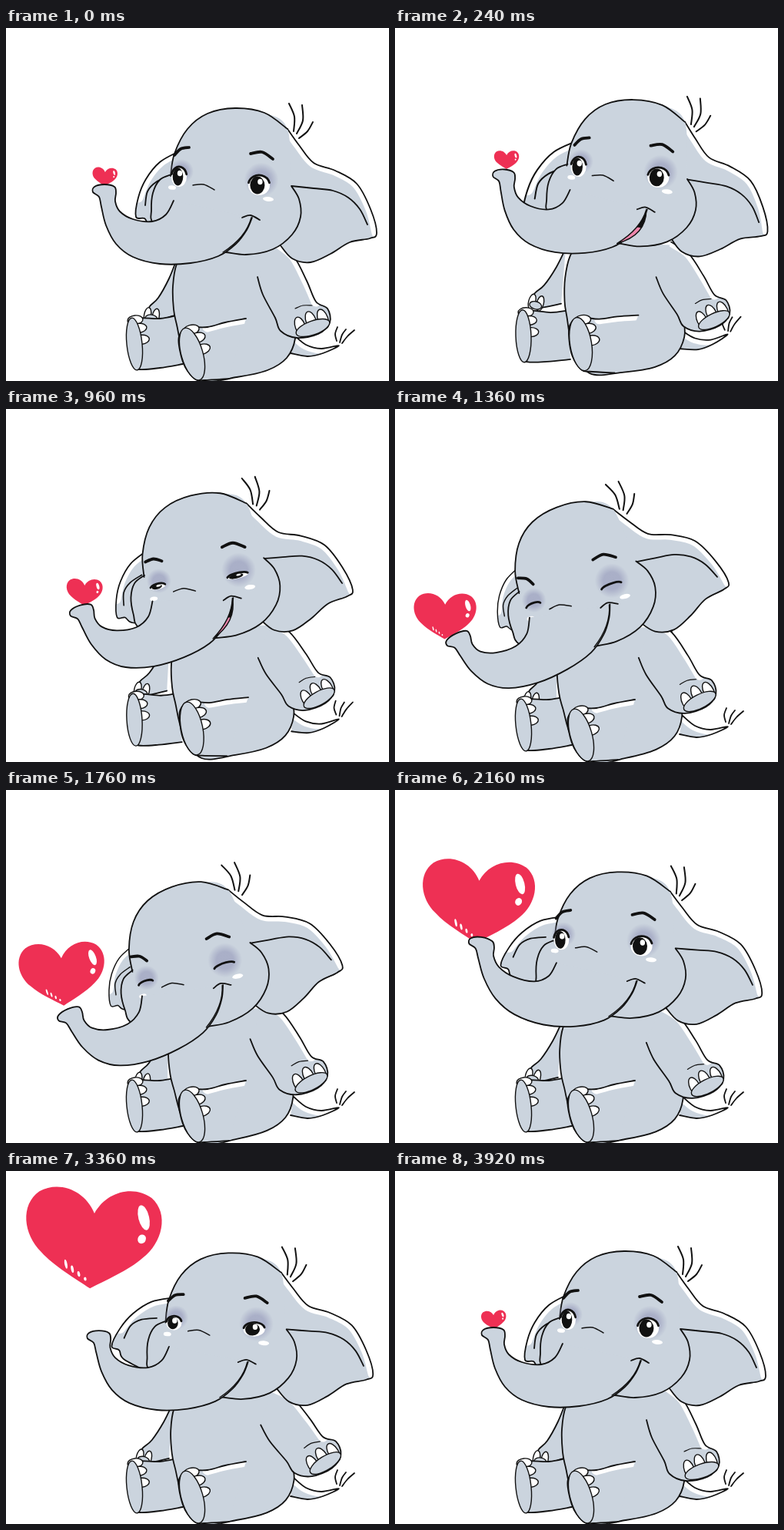
Write an HTML page with a canvas that moves like this. It is 498 px wide and 458 px high and loops after 4 s.

```html
<!DOCTYPE html>
<html lang="en">
<head>
<meta charset="utf-8">
<title>Elephant and heart</title>
<style>
html, body { margin: 0; width: 100%; height: 100%; overflow: hidden; background: #fff; }
canvas { display: block; }
</style>
</head>
<body>
<canvas id="stage" width="498" height="458"></canvas>
<script>
const ctx = document.getElementById('stage').getContext('2d');
const SKIN = '#cbd4de', INK = '#111', RED = '#ee3054', LOOP = 4000;

// Limbs move as [dx, dy, degrees, scale] around their own pivots.
const still = [0, 0, 0, 1];
const rest = {
  head: still, earL: still, earR: still, armL: still, armR: still,
  legL: still, legR: still, body: still, tail: still,
  tip: [0, 0], look: [0, 0], open: [1], laugh: [0]
};
const leanBack = {
  ...rest, head: [22, -27, 4, 1], earL: [0, 0, 5, 1.28], earR: [0, 0, 5, 1],
  armL: [0, -36, 12, 1], armR: [26, -4, -15, .9], legL: [0, -26, 10, 1], legR: [-1, -33, 17, 1],
  body: [4, -16, 8, 1], tail: [0, -15, -21, 1], tip: [14, -11], look: [11, 0], laugh: [1]
};
const bow = {
  ...rest, head: [-50, 12, -20, 1], earL: [0, 0, 4, .8], earR: [0, 0, 3, 1], armL: [-12, 4, 0, 1],
  armR: [-12, -3, -7, 1], body: [-4, 0, -3, 1], tip: [-10, 11], look: [1, 21], open: [0]
};
const lookUp = {
  ...rest, head: [-6, 2, -1.5, 1], earL: [0, 0, 20, 1],
  armL: [-5, 1, 4, 1], armR: [1, 2, -12, 1], body: [-2, 0, -1, 1], tip: [-1, -3]
};
const lift = { ...lookUp, armR: [-2, 2, -7, 1], tip: [-10, -21], look: [-2, -3] };
const squint = { ...lookUp, open: [.7] };

const poseKeys = [[0, rest], [560, leanBack], [1160, bow], [1680, bow], [2160, lift],
  [2640, lookUp], [3040, lookUp], [3360, squint], [3440, squint], [3920, rest]];
// time, [x, y, width]
const heartKeys = [[0, [128.5, 193, 32]], [560, [167, 142, 32]], [1120, [76, 276, 52]],
  [1360, [65, 269, 80]], [1680, [66, 258, 103]], [2160, [108, 145, 144]], [2280, [109, 126, 144]],
  [2800, [111.5, 90, 143]], [3360, [113, 88, 174]], [3680, [113, 84, 196]], [3720, [128, 203, 0]], [3920, [128.5, 193, 32]]];

const mix = (a, b, k) => a.map((v, i) => v + (b[i] - v) * k);
const smooth = k => k * k * (3 - 2 * k);
function span(keys, t) {
  const i = keys.findLastIndex(k => k[0] <= t), a = keys[i], b = keys[i + 1] || [LOOP, keys[0][1]];
  return [a[1], b[1], (t - a[0]) / (b[0] - a[0])];
}
function poseAt(t) {
  const [a, b, k] = span(poseKeys, t), pose = {};
  for (const name in rest) pose[name] = mix(a[name], b[name], smooth(k));
  return pose;
}

const pts = text => text.split(' ').map(Number);

// Catmull-Rom curve through a flat list of points
function curve(p) {
  const path = new Path2D(), last = p.length / 2 - 1;
  const get = (i, c) => p[2 * Math.max(0, Math.min(last, i)) + c];
  path.moveTo(p[0], p[1]);
  for (let i = 0; i < last; i++) {
    const [x, y] = [0, 1].map(c => [get(i, c) + (get(i + 1, c) - get(i - 1, c)) / 6,
      get(i + 1, c) - (get(i + 2, c) - get(i, c)) / 6, get(i + 1, c)]);
    path.bezierCurveTo(x[0], y[0], x[1], y[1], x[2], y[2]);
  }
  return path;
}
function fill(path, color = SKIN) {
  ctx.fillStyle = color;
  ctx.fill(path);
}
function stroke(path, width = 1.8, color = INK) {
  ctx.lineWidth = width;
  ctx.strokeStyle = color;
  ctx.stroke(path);
}
const line = (text, width) => stroke(curve(pts(text)), width);

// Filled outline with a white rim along the points rimFrom..rimTo
function shape(text, rimFrom, rimTo) {
  const p = pts(text), path = curve(p);
  fill(path);
  if (rimTo) {
    ctx.save();
    ctx.clip(path);
    stroke(curve(p.slice(rimFrom * 2, rimTo * 2)), 13, '#fff');
    ctx.restore();
  }
  stroke(path);
}
function oval(x, y, rx, ry, color, tilt = 0, outline = 0) {
  const path = new Path2D();
  path.ellipse(x, y, rx, ry, tilt, 0, 7);
  fill(path, color);
  if (outline) stroke(path, outline);
}
function group([dx, dy, deg, scale], px, py, draw) {
  ctx.save();
  ctx.translate(px + dx, py + dy);
  ctx.rotate(deg * Math.PI / 180);
  ctx.scale(scale, scale);
  ctx.translate(-px, -py);
  draw();
  ctx.restore();
}

// Nails sit on the edge of the sole, which covers their roots.
function paw(x, y, rx, ry, tilt, angles, nailX, nailY) {
  group([0, 0, tilt, 1], x, y, () => {
    for (const deg of angles) {
      const a = deg * Math.PI / 180;
      oval(x + rx * Math.cos(a), y + ry * Math.sin(a), nailX, nailY, '#fff', 0, 1.4);
    }
    oval(x, y, rx, ry, SKIN, 0, 1.4);
  });
}

const heartPath = new Path2D('M0-.19C.08-.36.28-.42.42-.33C.56-.22.52 0 .38.12C.28.22.1.31 0 .37C-.1.31-.28.22-.38.12C-.52 0-.56-.22-.42-.33C-.28-.42-.08-.36 0-.19');
function heart(t) {
  const [x, y, w] = mix(...span(heartKeys, t));
  if (w < 1) return;
  ctx.save();
  ctx.translate(x, y);
  ctx.rotate(.06 * Math.sin((t - 3080) / 1120 * 2 * Math.PI));
  ctx.scale(w, w);
  fill(heartPath, RED);
  oval(.37, -.18, .04, .095, '#fff', -.3);
  oval(.365, -.02, .03, .035, '#fff', .4);
  if (w > 60) for (let i = 0; i < 4; i++) oval(-.19 + i * .05, .2 + i * .034, .01, .035 - i * .007, '#fff', -.25);
  ctx.restore();
}

function eye(x, y, rx, open) {
  const r = rx * 1.6, ry = 13 * open;
  const glow = ctx.createRadialGradient(x + 3, y - 7, r * .5, x + 3, y - 7, r);
  glow.addColorStop(0, 'rgba(152,156,188,.65)');
  glow.addColorStop(1, 'rgba(152,156,188,0)');
  oval(x + 3, y - 7, r, r, glow);
  if (ry > 2) {
    oval(x, y, rx, ry, '#fff');
    oval(x - rx * .15, y, rx * .68, ry * .88, INK);
    oval(x + rx * .1, y - ry * .35, 3.2, Math.min(3.8, ry * .4), '#fff');
  }
  const lid = new Path2D();
  lid.ellipse(x, y, rx, Math.max(ry, 4), 0, Math.PI * 1.08, Math.PI * 1.92);
  stroke(lid, 2.8);
}

function mouth(laugh) {
  const path = new Path2D(`M319 246Q312 272 282 291Q${312 + 20 * laugh} ${272 + 20 * laugh} 319 246`);
  ctx.save();
  ctx.clip(path);
  fill(path, INK);
  oval(303, 284, 20, 14, '#ee86ac', -.3);
  ctx.restore();
  stroke(path, 1.4);
}

// The nearer to its end, the more the trunk follows the tip.
function trunk([dx, dy]) {
  const p = pts('320 246 313 262 299 280 276 296 240 305 200 306 165 297 143 280 130 256 124 232 121 219 113 213 115 206 128 203 141 206 143 214 142 225 148 238 165 248 190 251 208 242 218 224');
  for (let i = 0; i < p.length; i += 2) {
    const pull = Math.max(0, Math.min(1, (300 - p[i]) / 180)) ** 2;
    p[i] += dx * pull;
    p[i + 1] += dy * pull;
  }
  const path = curve(p);
  fill(path);
  stroke(path);
}

function head(pose) {
  const open = pose.open[0];
  group(pose.earL, 225, 160, () => {
    shape('225 160 200 174 182 196 172 220 169 245 180 247 189 256 225 262', 0, 4);
    line('181 230 184 212 195 200 213 192');
  });
  group(pose.earR, 366, 131, () => {
    shape('366 131 381 152 400 175 428 185 456 202 474 235 482 266 473 273 447 278 422 293 396 304 372 299 356 281', 0, 7);
    line('371 205 400 208 425 211 445 220 460 235 470 255');
  });
  ['374 134 375 115 368 98', '378 137 386 120 385 100', '381 143 392 134 399 122'].forEach(h => line(h, 2));

  const skull = '214 192 219 163 236 131 262 111 298 104 336 110 366 131';
  const cheeks = '371 205 381 222 383 245 372 268 347 287 312 294 276 290 225 290 192 255 189 236 191 214 200 197 215 190';
  fill(curve(pts(skull + ' ' + cheeks)));
  line(skull);
  line(cheeks);

  group([...pose.look, 0, 1], 0, 0, () => {
    eye(225, 193, 10, open);
    eye(329, 204, 14, open);
    group([0, 0, 70 * (1 - open) ** 2, 1], 228, 158, () => line('219 165 227 157 238 155', 3.8));
    line('318 163 333 161 347 170', 3.8);
    line('243 204 257 203 271 210', 1.5);
    oval(216, 207, 5, 2.8, '#fff', .1);
    oval(341, 222, 7, 3, '#fff', .1);
  });
  trunk(pose.tip);
  mouth(pose.laugh[0]);
  line('307 246 318 243 330 249');
}

function elephant(pose) {
  group(pose.tail, 372, 410, () => {
    shape('374 398 390 411 410 416 433 412 412 422 392 426 370 422', 0, 4);
    ['430 406 428 397 431 388', '434 408 437 398 442 391', '437 409 444 400 453 392'].forEach(h => line(h));
  });
  group(pose.armL, 222, 300, () => {
    shape('222 300 212 325 198 350 187 361 182 372 192 380 222 372');
    paw(189, 377, 8, 5, 10, [-135, -50], 4.5, 10);
  });
  group(pose.legL, 168, 410, () => {
    shape('222 373 200 377 166 377 158 392 159 415 165 436 174 443 200 441 230 436');
    paw(167, 410, 10, 34, -6, [-65, -36, -8], 10, 6);
  });
  group(pose.body, 300, 380, () =>
    shape('235 285 222 306 217 335 218 365 222 385 232 425 256 457 300 453 340 444 365 428 376 403 374 375 368 285'));
  group(pose.legR, 241, 423, () => {
    shape('312 377 285 382 262 388 236 389 225 400 226 418 233 440 247 456 258 457 290 455', 0, 3);
    paw(242, 423, 14, 35, -16, [-60, -32, -4], 11, 6.5);
  });
  group(pose.armR, 350, 310, () => {
    shape('327 323 334 346 350 376 357 393 378 402 406 397 421 382 418 364 403 355 391 328 374 296 352 278', 8, 12);
    line('376 364 386 360 398 360', 1.2);
    paw(399, 389, 23, 9, -20, [-130, -88, -45], 6.5, 13);
  });
  group(pose.head, 312, 217, () => head(pose));
}

function tick() {
  const now = performance.now() % LOOP;
  const step = now >= 2160 && now < 2800 ? 40 : 80;
  const t = Math.floor(now / step) * step;
  ctx.fillStyle = '#fff';
  ctx.fillRect(0, 0, 498, 458);
  ctx.lineCap = ctx.lineJoin = 'round';
  heart(t);
  elephant(poseAt(t));
  requestAnimationFrame(tick);
}
tick();
</script>
</body>
</html>
```
